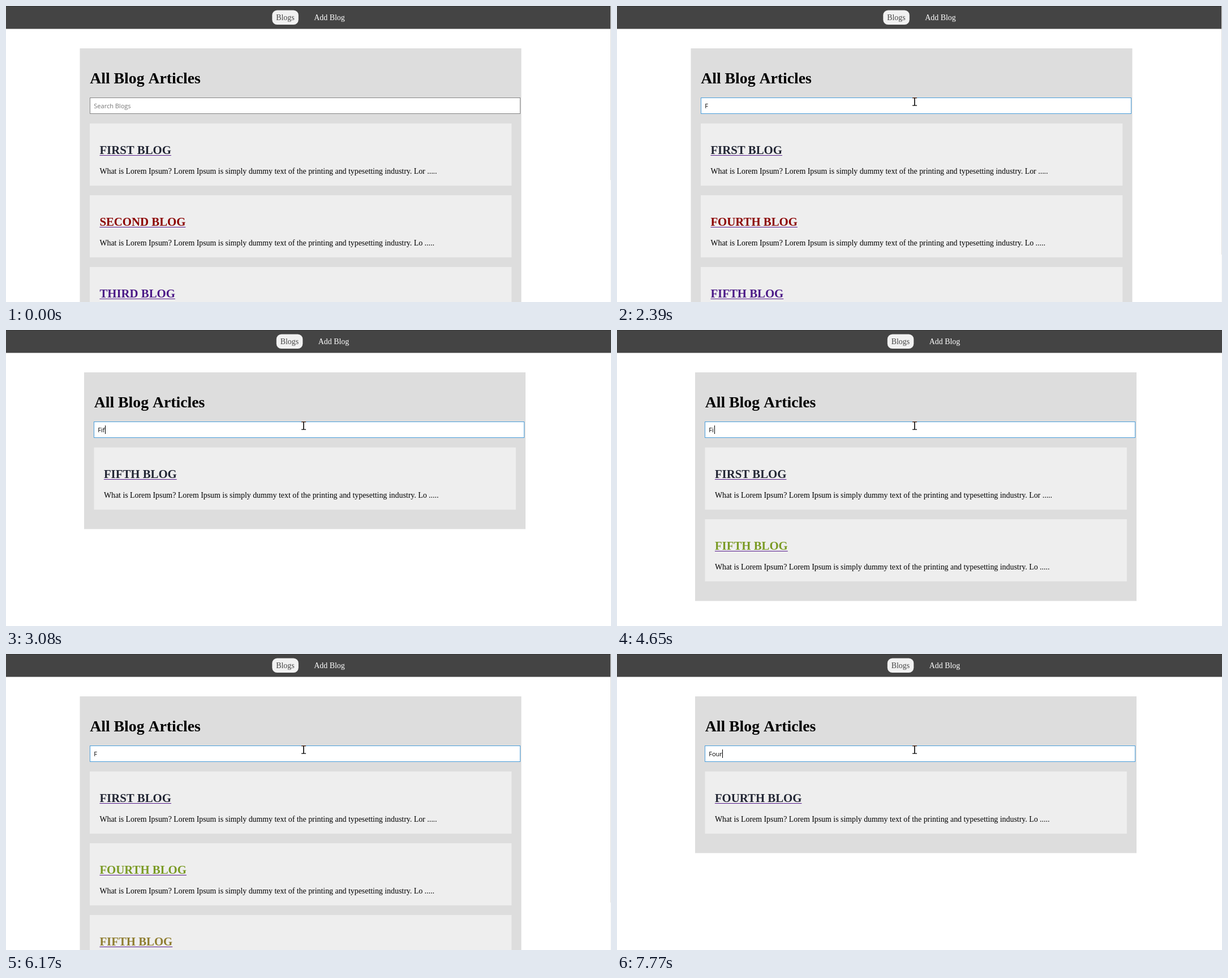
Animation of 1069 by 524 pixels, one loop 8000 ms. Source, as an HTML page with a canvas:

```html
<!DOCTYPE html>
<html lang="en">
<head>
<meta charset="utf-8">
<title>Blog search</title>
<style>
  html, body { margin: 0; height: 100%; overflow: hidden; background: #fff; }
  canvas { display: block; }
</style>
</head>
<body>
<canvas width="1069" height="524"></canvas>
<script>
const ctx = document.querySelector('canvas').getContext('2d');
const LOOP = 8000;
const SERIF = '"Liberation Serif", "Times New Roman", serif';
const BODY = `13.87px ${SERIF}`;
const SANS = '11px "Open Sans", "Noto Sans", sans-serif';
const TITLES = ['FIRST', 'SECOND', 'THIRD', 'FOURTH', 'FIFTH'];
const LOREM = 'What is Lorem Ipsum? Lorem Ipsum is simply dummy text of the printing and typesetting industry. ';

// [start ms, query, caret x (0 = hidden)]
const STEPS = [
  [0, '', 0], [800, '', 155], [1320, '', 0], [1800, '', 155],
  [2130, 'F', 161], [2390, 'F', 0], [2800, 'Fi', 172],
  [3080, 'Fif', 175], [3450, 'Fif', 0], [3960, 'Fif', 175], [4500, 'Fif', 0],
  [4650, 'Fi', 172], [4910, 'F', 161], [5070, 'F', 0], [5560, 'F', 161], [6170, 'F', 0],
  [6320, 'Fo', 175], [6580, 'Fou', 181], [6730, 'Fou', 0],
  [6930, 'Four', 186], [7240, 'Four', 0], [7770, 'Four', 186]
];

function rect(x, y, w, h, color) {
  ctx.fillStyle = color;
  ctx.fillRect(x, y, w, h);
}

function text(str, x, y, font, color) {
  ctx.font = font;
  ctx.fillStyle = color;
  ctx.fillText(str, x, y);
}

function drawNav(dx) {
  rect(0, 0, 1069, 40.5, '#444');
  rect(0, 0, 1069, 1, '#333');
  ctx.fillStyle = '#f1f1f1';
  ctx.beginPath();
  ctx.roundRect(470.3 + dx, 7.5, 46.5, 25.5, 8.7);
  ctx.fill();
  text('Blogs', 477.2 + dx, 25, BODY, '#444');
  text('Add Blog', 544.3 + dx, 25, BODY, '#fff');
}

function drawInput(x, query, caret, border) {
  rect(x, 162, 761, 29, border);
  rect(x + 1, 163, 759, 27, '#fff');
  text(query || 'Search Blogs', x + 7.3, 181, SANS, query ? '#000' : '#757575');
  if (caret) rect(caret, 169, 1, 15, '#000');
}

function drawCard(title, x, y, color) {
  const font = `bold 20.8px ${SERIF}`, heading = title + ' BLOG';
  rect(x, y, 745.3, 110, '#eee');
  text(heading, x + 17.4, y + 54, font, color);
  rect(x + 17.4, Math.round(y + 56), ctx.measureText(heading).width, 1, '#551a8b');
  text(LOREM + (title === 'FIRST' ? 'Lor' : 'Lo') + ' .....', x + 17.4, y + 89, BODY, '#000');
}

function drawPointer(t) {
  if (t < 70) return;
  if (t >= 600) {
    rect(525, 163, 1.7, 13, '#111');
    rect(522, 162, 8, 1.3, '#3a1a0c');
    rect(522, 175.5, 8, 1.3, '#111');
    return;
  }
  const left = 1 - (Math.floor((t - 70) / 48) + 1) / 12;
  ctx.save();
  ctx.translate(525 + 432 * left * left, 169 + 345 * left * left);
  ctx.beginPath();
  [[0, 0], [0, 15], [3.5, 12], [6, 17], [8, 16], [5.7, 11], [10.5, 11]]
    .forEach(p => ctx.lineTo(...p));
  ctx.closePath();
  ctx.fillStyle = '#fff';
  ctx.fill();
  ctx.strokeStyle = '#000';
  ctx.stroke();
  ctx.restore();
}

function draw(t) {
  const [, query, caret] = STEPS.findLast(s => s[0] <= t);
  const found = TITLES.filter(title => title.startsWith(query.toUpperCase()));
  const scrolls = found.length > 2;
  const dx = scrolls ? 0 : 7.5;
  // A card keeps its colour until it is removed from the list
  const colors = ['#212533', t < 3080 ? '#8b0000' : '#7a9a24', t < 2800 ? '#4b1887' : '#8f7d30'];

  rect(0, 0, 1069, 524, '#fff');
  drawNav(dx);
  rect(130.5 + dx, 75, 780, 150.2 + 127.25 * found.length, '#ddd');
  text('All Blog Articles', 148.2 + dx, 137, `bold 27.74px ${SERIF}`, '#000');
  drawInput(scrolls ? 148 : 155, query, caret, t >= 800 ? '#4a9edb' : t >= 600 ? '#333' : '#858585');
  found.slice(0, 3).forEach((title, i) =>
    drawCard(title, 148 + dx, 208 + Math.floor(127.25 * i), colors[i]));
  if (scrolls) {
    rect(1068, 0, 1, 524, '#f6f6f6');
    rect(1068, 0, 1, query ? 440 : 308, '#dedede');
  }
  drawPointer(t);
}

function tick() {
  draw(performance.now() % LOOP);
  requestAnimationFrame(tick);
}
tick();
</script>
</body>
</html>
```
